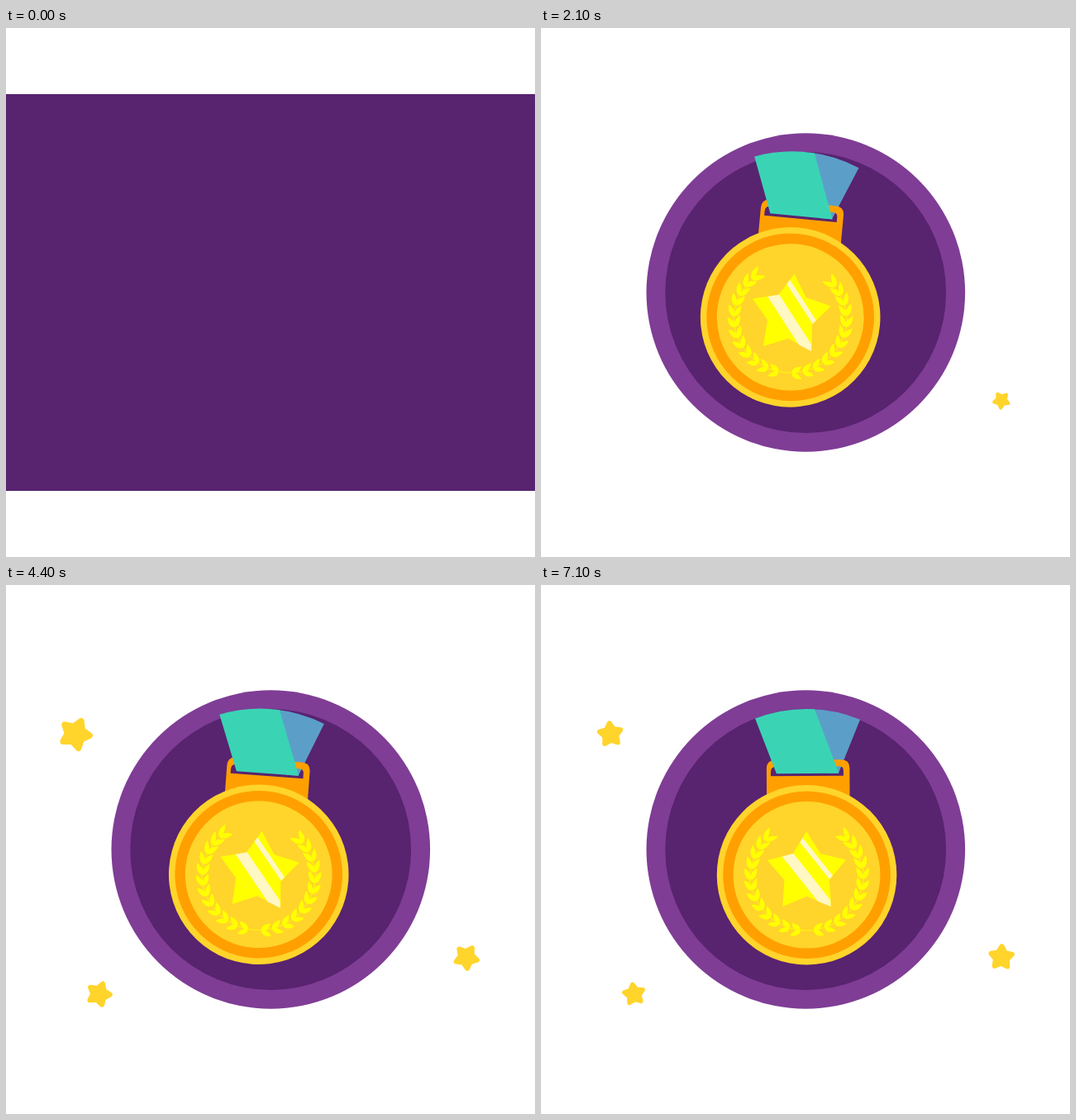
Write an HTML page that moves like this. It is 640 px wide and 640 px high and loops after 7200 ms.

```html
<!DOCTYPE html>
<html lang="en">
<head>
<meta charset="utf-8">
<title>Medal</title>
<style>
  html, body { margin: 0; width: 100%; height: 100%; overflow: hidden; background: #fff; }
  svg { display: block; width: 100%; height: 100%; }
</style>
</head>
<body>
<svg viewBox="0 0 640 640">
  <defs>
    <clipPath id="stage"><rect y="80" width="640" height="480"/></clipPath>
  </defs>
  <g clip-path="url(#stage)">
    <circle id="ring" cx="320.3" cy="320" fill="#7f3d95"/>
    <circle id="disc" cx="320.2" cy="320" fill="#58236f"/>
    <g id="medal">
      <path fill="#5b9fc9" d="M325 150.1A170 170 0 0 1 386 163.2L359.5 228H345Z"/>
      <path fill="#ffa000" fill-rule="evenodd" d="M272.5 262V222Q272.5 211.5 283 211.5H362.5Q373 211.5 373 222V262ZM277.5 231H365.5V225Q365.5 219.5 360 219.5H284Q277.5 219.5 277.5 226Z"/>
      <path fill="#3ad4b5" d="M259 161.3A170 170 0 0 1 331 150.4L360 228H284.5Z"/>
      <g transform="translate(320.5 350.7)">
        <circle r="108.8" fill="#ffd42b"/>
        <circle r="95.1" fill="none" stroke="#ffa000" stroke-width="12.4"/>
        <g id="face" transform="scale(.5238)"></g>
      </g>
    </g>
    <g id="stars" fill="#ffd42b" stroke="#ffd42b" stroke-width="6" stroke-linejoin="round"></g>
  </g>
</svg>
<script>
const LOOP = 7200, STEP = 100, TURN = 2 * Math.PI;
const $ = id => document.getElementById(id);
const rad = deg => deg * Math.PI / 180;
const clamp = v => Math.min(1, Math.max(0, v));

function add(parent, d, attrs = {}) {
  const p = document.createElementNS('http://www.w3.org/2000/svg', 'path');
  p.setAttribute('d', d);
  for (const k in attrs) p.setAttribute(k, attrs[k]);
  parent.appendChild(p);
  return p;
}

function starPath(outer, inner, cy = 0) {
  const pts = [];
  for (let i = 0; i < 10; i++) {
    const r = i % 2 ? inner : outer, a = rad(i * 36 - 90);
    pts.push((r * Math.cos(a)).toFixed(2) + ' ' + (cy + r * Math.sin(a)).toFixed(2));
  }
  return 'M' + pts.join('L') + 'Z';
}

// Laurel: leaf pairs along an arc, mirrored for the other half
function buildWreath(face) {
  const fill = '#ff0', pairs = 12;
  add(face, 'M-98 -75A130 130 0 0 0 -131.5 -3A131.5 131.5 0 0 0 131.5 -3A130 130 0 0 0 98 -75',
    { fill: 'none', stroke: fill, 'stroke-width': 1.6 });
  for (let i = 0; i < pairs; i++) {
    const f = i / (pairs - 1), a = 6 + 121.5 * f, r = 132 - 8 * f ** 3;
    const x = -r * Math.sin(rad(a)), y = r * Math.cos(rad(a)) - 3;
    const len = 28 + 6 * f;
    const leaf = `M2 0C${len * .2} -8 ${len * .65} -8 ${len} 0C${len * .65} 7 ${len * .2} 7 2 0Z`;
    for (const turn of [16 * f - 31, 31 + 4 * f]) {
      const place = `translate(${x} ${y}) rotate(${180 + a + turn})`;
      add(face, leaf, { fill, transform: place });
      add(face, leaf, { fill, transform: 'scale(-1 1) ' + place });
    }
  }
}

const face = $('face');
buildWreath(face);
add(face, starPath(95.7, 54.5, -4.8), { fill: '#ff0' });
add(face, 'M-56.5-42.5L-30.5-49.5 54.3 58 55 73.5 25.5 61.5ZM-9-85.5L60 2 53 10.5-15.5-75.5Z',
  { fill: '#fff7c4' });

const stars = [
  { x: 557, y: 450.5, born: 1950, turn: -39 },
  { x: 84, y: 180.5, born: 2750, turn: -47 },
  { x: 112.5, y: 495, born: 3950, turn: -50 }
];
for (const s of stars) s.el = add($('stars'), starPath(13.3, 7.3));

const shrink = (end, stop, t) => end + 36 * Math.max(0, (stop - t) / 100) ** 1.5;

// Pendulum: eases from one turning point to the next
const peaks = [9.4, -5.8, 5.5, -3, 3], HALF = 1600, FIRST = 1550;
function swing(t) {
  const pos = Math.max(0, (t - FIRST) / HALF), i = Math.floor(pos);
  const ease = (1 - Math.cos(Math.PI * (pos - i))) / 2;
  return (peaks[i] + (peaks[i + 1] - peaks[i]) * ease) * clamp((t - 1200) / 350);
}

// Every beat the star shrinks a little, then pops
function pulse(age) {
  const u = ((age - 900) % 2200) / 800;
  const w = u > 0 && u < 1 ? -Math.sin(TURN * u) : 0;
  return 1 + w * (w > 0 ? .75 : .27);
}

function draw(t) {
  $('ring').setAttribute('r', shrink(192.8, 800, t));
  $('disc').setAttribute('r', shrink(169.9, 600, t));

  const extra = 1.286 * (1 - clamp((t - 1100) / 500)) ** 1.55;
  const x = 320.5 - 3.3 * extra, y = 351 - 137 * extra;
  $('medal').setAttribute('visibility', t < 1100 ? 'hidden' : 'visible');
  $('medal').setAttribute('transform',
    `rotate(${swing(t)} 320 150) translate(${x} ${y}) scale(${1 + extra}) translate(-320.5 -351)`);

  for (const { x, y, born, turn, el } of stars) {
    const age = t - born, grow = clamp(age / 220);
    const angle = turn + .016 * t - 80 * (1 - grow);
    el.setAttribute('visibility', age > 0 ? 'visible' : 'hidden');
    el.setAttribute('transform',
      `translate(${x} ${y}) rotate(${angle}) scale(${grow * pulse(age)})`);
  }
}

const start = performance.now();
function tick() {
  const t = (performance.now() - start) % LOOP;
  draw(Math.floor(t / STEP) * STEP);
  requestAnimationFrame(tick);
}
tick();
</script>
</body>
</html>
```
